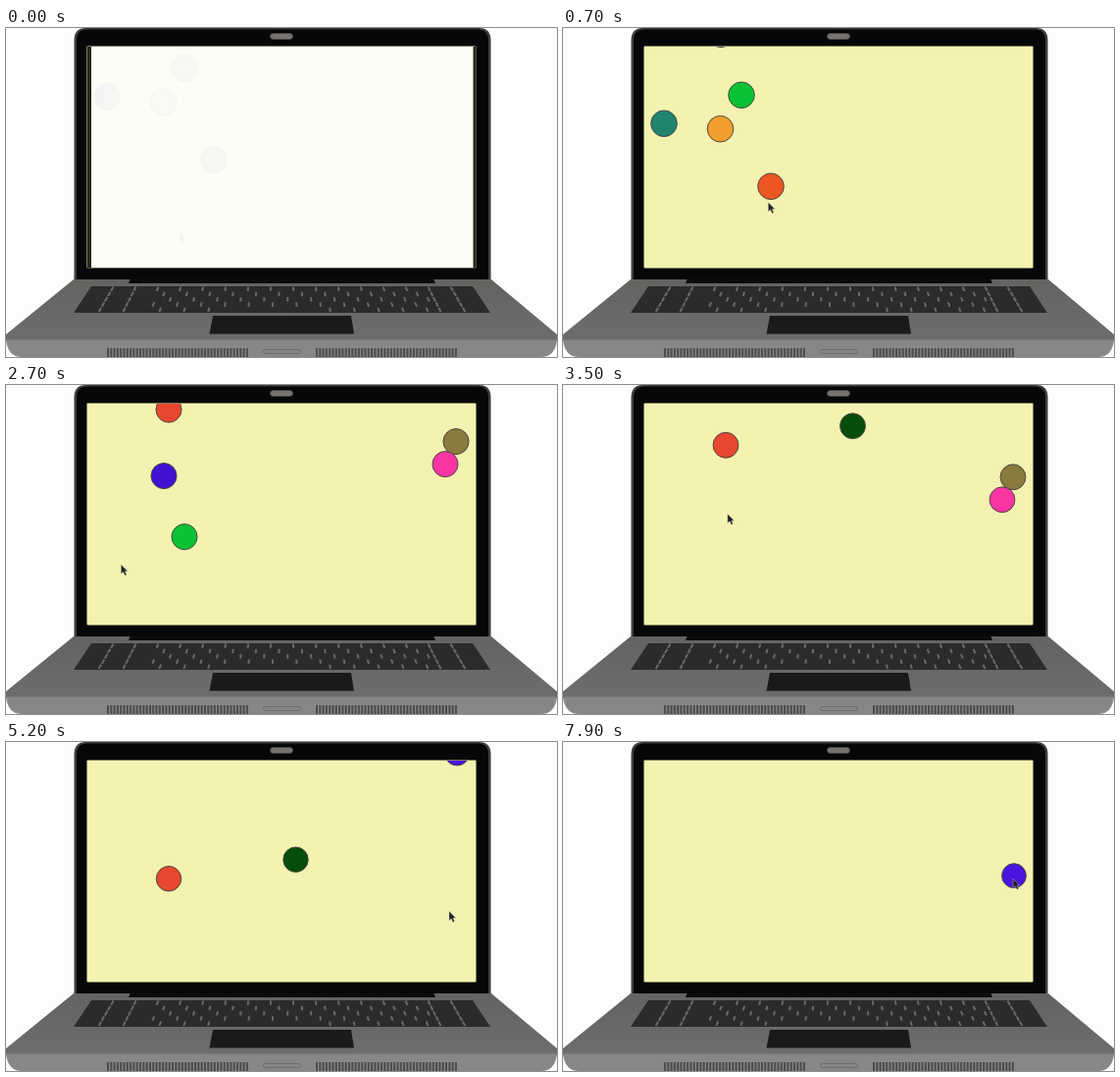
Write an HTML page that moves like this. It is 562x335 px and loops after 8000 ms.

```html
<!DOCTYPE html>
<html lang="en">
<head>
<meta charset="utf-8">
<title>Falling balls on a laptop</title>
<style>
html, body { margin: 0; width: 100%; height: 100%; overflow: hidden; background: #fdfdfd; }
svg { display: block; width: 562px; height: 335px; }
.soft { filter: blur(.5px); }
</style>
</head>
<body>
<svg viewBox="0 0 562 335">
  <defs>
    <clipPath id="screen"><rect x="83" y="19" width="396.5" height="225.5"/></clipPath>
    <linearGradient id="deck" x2="0" y2="1">
      <stop stop-color="#646361"/><stop offset="1" stop-color="#6e6d6b"/>
    </linearGradient>
  </defs>

  <g class="soft">
    <!-- lid -->
    <path d="M69.5 258V12Q70 0 81 0H483Q494 0 494.5 12V258Z" fill="#3b3c3e"/>
    <path d="M72 258V13Q72 1.5 83 1.5H481Q492 1.5 492 13V258Z" fill="#060709"/>
    <rect x="269.5" y="5.5" width="23" height="6" rx="3" fill="#77736f" stroke="#444"/>
    <rect x="82.5" y="18.5" width="397" height="226" rx="1" fill="#f3f2b0"/>

    <!-- base -->
    <path d="M69 256H495L562 312V319H0V312Z" fill="url(#deck)"/>
    <path d="M127 255H436L438 260H125Z" fill="#0b0b0c"/>
    <path d="M0 317.5H562Q560 335 546 335H16Q2 335 0 317.5Z" fill="#878787"/>
    <path d="M87 263H476L494 290H69Z" fill="#2b2b2b"/>
    <g id="keys" stroke="#6b6a68" stroke-width="2"></g>
    <path d="M211 293H352L355 311.5H207.5Z" fill="#191a19"/>
    <path d="M103 330.5H248M316 330.5H461" stroke="#4c4c4c" stroke-width="9" stroke-dasharray="2 1.3"/>
    <rect x="262.5" y="327.5" width="38" height="4" rx="2" fill="#858585" stroke="#6c6c6c"/>
  </g>

  <g clip-path="url(#screen)">
    <g id="balls" stroke="#4a4a40"></g>
    <path id="cursor" d="M0 0V9.5L2.2 7.6 3.9 11.2 5.6 10.4 4 7H6.8Z" fill="#20202a" stroke="#d8d8c0" stroke-width=".4"/>
    <g id="veil">
      <path d="M83 19H480V245H83Z" fill="#1c1d14"/>
      <path d="M87 19H476.5V244H87Z" fill="#fdfdfa"/>
    </g>
  </g>
</svg>

<script>
const LOOP = 8, FPS = 10;
const get = id => document.getElementById(id);

function add(parent, tag, attrs) {
  const el = document.createElementNS('http://www.w3.org/2000/svg', tag);
  for (const k in attrs) el.setAttribute(k, attrs[k]);
  return parent.prepend(el), el;
}

// Gaps between keys: straight columns outside, staggered inside, none in the space bar
const ROWS = 5, COLS = 17;
const edge = (u, y) => 281.5 + (u - .5) * (389 + (y - 263) * 4 / 3);
for (let row = 0; row < ROWS; row++) {
  const top = 263.5 + row * 5.3, bottom = top + 4.3;
  for (let col = 1; col < COLS; col++) {
    const inner = col > 2 && col < COLS - 2;
    if (row === ROWS - 1 && col > 5 && col < 10) continue;
    const u = (col + (inner ? row * .37 % 1 : 0)) / COLS;
    add(get('keys'), 'path', { d: `M${edge(u, top)} ${top}L${edge(u, bottom)} ${bottom}` });
  }
}

// Balls in order of popping: x, height at the start, colour, time of the pop
const balls = [
  [212, 134, '#ec5623', .9],
  [160.5, 75.5, '#f09f2d', 1.9],
  [103, 70, '#208471', 2.6],
  [182, 41, '#0ac233', 3],
  [161, -21, '#4311d2', 3.4],
  [448, -33, '#f935a4', 4.7],
  [459, -56, '#8b7a3d', 5.1],
  [295.5, -108, '#064c0b', 5.8],
  [166, -88.5, '#e7472f', 6.7],
  [460, -216.5, '#4b15e0', LOOP],
].map(([x, y, fill, end]) => ({
  x, y, end, el: add(get('balls'), 'circle', { cx: x, fill })
}));

// The fall starts slowly and settles at 46.4 px/s
const fall = t => 46.4 * t - 14 * (1 - Math.exp(-t / 1.5));

// The pointer goes from ball to ball, with a few rests between
const stops = [
  [0, 177, 208], [6.3, 218, 227], [7.2, 459, 139],
  ...balls.slice(0, -1).map(b => [b.end, b.x + 2, b.y + fall(b.end) + 2]),
].sort((a, b) => a[0] - b[0]);

function pointer(t) {
  const i = stops.findIndex(s => s[0] > t);
  if (i < 0) return stops.at(-1).slice(1);
  const [t0, x0, y0] = stops[i - 1], [t1, x1, y1] = stops[i];
  const k = (t - t0) / (t1 - t0), ease = k * k * (3 - 2 * k);
  const sag = .06 * Math.abs(x1 - x0) * Math.sin(Math.PI * k);
  return [x0 + (x1 - x0) * ease, y0 + (y1 - y0) * ease + sag];
}

const start = performance.now();
function draw() {
  const t = Math.floor((performance.now() - start) / 1000 % LOOP * FPS) / FPS;
  const veil = Math.max(0, .95 - t / .4);
  for (const b of balls) {
    b.el.setAttribute('cy', b.y + fall(t));
    b.el.setAttribute('r', 13.4 - .13 * t);
    b.el.setAttribute('visibility', t < b.end ? 'visible' : 'hidden');
  }
  get('balls').style.filter = `grayscale(${veil})`;
  get('cursor').setAttribute('transform', `translate(${pointer(t)})`);
  get('veil').setAttribute('opacity', veil);
  requestAnimationFrame(draw);
}
draw();
</script>
</body>
</html>
```
